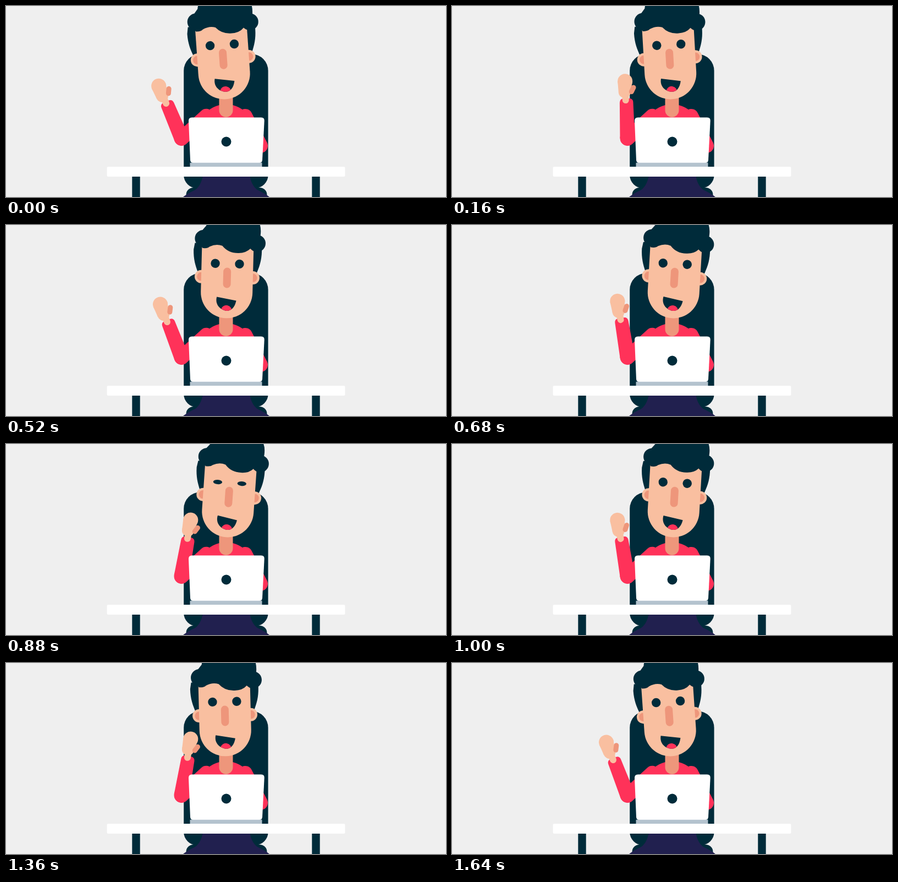
Recreate the animation shown at these times as an HTML page with a canvas. Size 800 by 347 pixels, loop 1680 ms.

```html
<!DOCTYPE html>
<html lang="en">
<head>
<meta charset="utf-8">
<title>Waving at the desk</title>
<style>
  html, body { margin: 0; width: 100%; height: 100%; overflow: hidden; background: #efefef; }
  canvas { display: block; width: 100vw; height: 100vh; }
</style>
</head>
<body>
<canvas id="stage" width="800" height="347"></canvas>
<script>
const ctx = document.getElementById('stage').getContext('2d');
const LOOP = 1680, STEP = 40;
const DARK = '#002b3a', SKIN = '#f9bfa0', SHADE = '#ee967b', RED = '#ff3259';
const NAVY = '#21204f', WHITE = '#fff', BACK = '#efefef', METAL = '#b4c3ce';
const rad = deg => deg * Math.PI / 180;

function circle(color, x, y, r, ry = r) {
  ctx.fillStyle = color;
  ctx.beginPath();
  ctx.ellipse(x, y, r, ry, 0, 0, 2 * Math.PI);
  ctx.fill();
}

function box(color, x, y, w, h, r = 0) {
  ctx.fillStyle = color;
  ctx.beginPath();
  ctx.roundRect(x, y, w, h, r);
  ctx.fill();
}

function limb(color, width, x1, y1, x2, y2) {
  ctx.strokeStyle = color;
  ctx.lineWidth = width;
  ctx.lineCap = 'round';
  ctx.beginPath();
  ctx.moveTo(x1, y1);
  ctx.lineTo(x2, y2);
  ctx.stroke();
}

function shape(color, path) {
  ctx.fillStyle = color;
  ctx.fill(new Path2D(path));
}

function turned(x, y, deg, draw) {
  ctx.save();
  ctx.translate(x, y);
  ctx.rotate(rad(deg));
  draw();
  ctx.restore();
}

function drawChair() {
  box(DARK, 323.2, 87.5, 153.4, 243.5, [30, 30, 24, 24]);
  box(DARK, 327.5, 330, 147, 40, 13);
  shape(NAVY, 'M358 305 Q356 325 344 334 Q331 340 322 347 H479 Q470 340 457 334 Q445 325 443 305 Z');
}

function drawBody() {
  shape(RED, 'M350 203 L368 190 Q376 183 388 180 H412 Q424 183 432 190 L450 203 V285 H350 Z');
  limb(RED, 26, 435, 200, 463, 254);
  limb(RED, 26, 364, 199.8, 319, 241);
  box(SHADE, 387.5, 150, 25, 52, 12.5);
}

// Local origin is the elbow, the forearm points up.
function drawForearm() {
  circle(RED, 0, 0, 13.5);
  shape(RED, 'M-13.500 0 L-12 -65 Q-11.500 -72 -5 -72 H5 Q12 -72 12.500 -65 L13.500 0 Z');
  limb(SKIN, 12, -1, -69, -1, -85);
  shape(SKIN, 'M-14.500 -104 L-13.500 -84 H8.500 L12.500 -103 Z');
  circle(SKIN, -1, -103.4, 13.5);
  circle(SKIN, -2.5, -83.8, 11);
  limb(SHADE, 9, 10, -84, 14, -91.5);
}

function drawMouth() {
  turned(0, -36, 10, () => {
    ctx.save();
    ctx.beginPath();
    ctx.moveTo(-18, 0);
    ctx.lineTo(18, 0);
    ctx.bezierCurveTo(18, 13, 12, 21.5, 3, 21.5);
    ctx.bezierCurveTo(-9, 21.5, -19, 13, -18, 0);
    ctx.fillStyle = DARK;
    ctx.fill();
    ctx.clip();
    circle(RED, 4, 21.5, 10);
    ctx.restore();
  });
}

// Local origin is the base of the head, just below the chin.
function drawHead(eyeOpen) {
  shape(DARK, 'M-62 -124 C-62 -106 -58 -95 -53 -82 H53 C58 -95 62 -106 62 -124 L62 -136 H-60 Z');
  for (const side of [-1, 1]) {
    circle(SKIN, side * 47, -75.2, 12);
    circle(SHADE, side * 47, -75.2, 7.8);
  }
  box(SKIN, -47, -140, 94, 139.3, [0, 0, 47, 47]);
  circle(DARK, -44.8, -144.5, 15.5);
  circle(DARK, 53, -138, 15.5);
  shape(DARK, 'M-46 -127 Q-37 -126 -33 -130 Q-21 -136 -10 -132 Q1 -119 19 -119.500 Q33 -119.500 41 -128 '
    + 'L56 -138 L59 -154 Q62 -190 25 -190 H-15 Q-38 -186 -40 -168 L-58 -146 Z');
  for (const side of [-1, 1]) circle(DARK, side * 22, -99.7, 8.2, 8.2 * eyeOpen);
  box(SHADE, -7, -92.5, 14, 37, 7);
  drawMouth();
}

function drawDesk() {
  shape(WHITE, 'M338 202.500 H464 Q470 202.500 469.700 208.500 L466 280 Q465.500 285 461 285 '
    + 'H340 Q335.500 285 335 280 L332 208.500 Q332 202.500 338 202.500 Z');
  circle(DARK, 400.5, 246.5, 9);
  box(METAL, 334.5, 284.8, 131, 8);
  box(DARK, 229.3, 308, 14.4, 39);
  box(DARK, 556.3, 308, 14.4, 39);
  box(WHITE, 183.5, 292, 433, 18, 2.5);
}

function render(t) {
  const sway = -4 * Math.cos(2 * Math.PI * t / LOOP);
  const wave = -5.7 - 17.3 * Math.cos(6 * Math.PI * t / LOOP);
  const eyeOpen = Math.max(0.1, Math.min(1, Math.abs(t - LOOP / 2) / 80));
  box(BACK, 0, 0, 800, 347);
  drawChair();
  drawBody();
  turned(319, 240, wave, drawForearm);
  turned(400, 170, sway, () => drawHead(eyeOpen));
  drawDesk();
}

function tick() {
  const t = performance.now() % LOOP;
  render(Math.floor(t / STEP) * STEP);
  requestAnimationFrame(tick);
}
tick();
</script>
</body>
</html>
```
